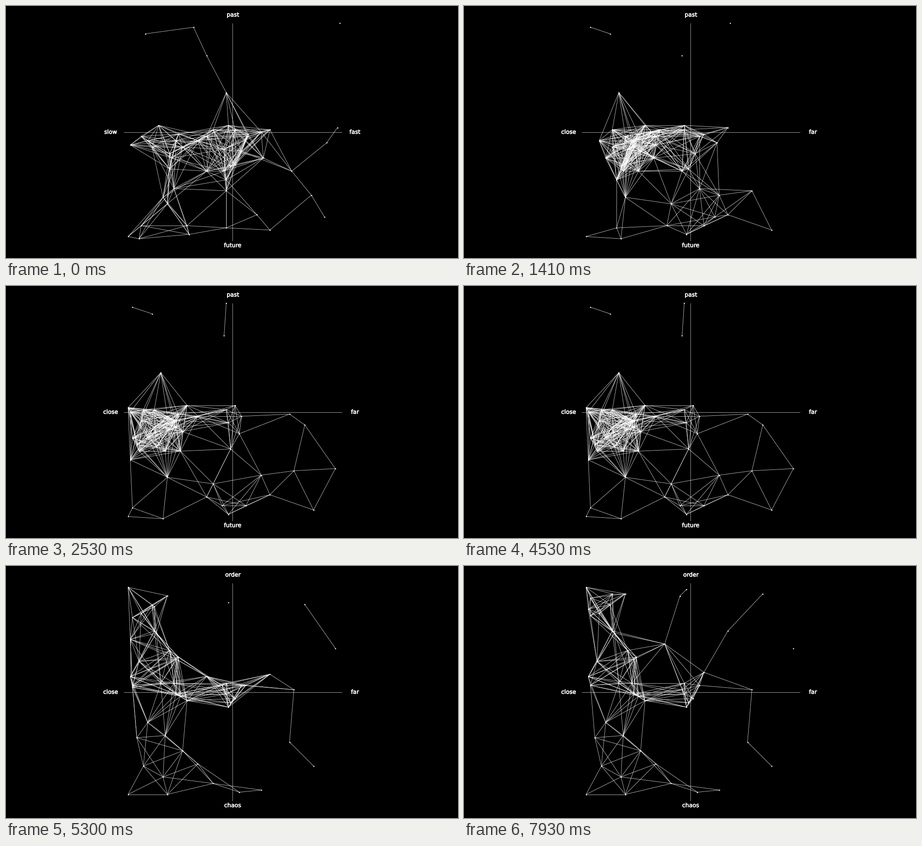
A matplotlib script that plays this animation: 1002 by 559 pixels, repeating every 8 s.

```python
import numpy as np
import matplotlib.pyplot as plt
from matplotlib.animation import FuncAnimation
from matplotlib.collections import LineCollection
from matplotlib.patheffects import withStroke

W, H, DPI = 1002, 559, 100
LOOP, INTERVAL, TICK = 8000, 20, 70
UNIT = 4.836            # pixels per scale step (scales run 0 to 100)
REACH = 25              # nodes closer than this are linked
PX = 72 / DPI           # one pixel in points

# Each node's rating on the four scales
TIME = np.array([
    0, 2, 5, 15, 32, 47, 47, 48, 49, 49, 49, 50, 51, 51, 52, 52, 52,
    54, 54, 54, 55, 56, 57, 57, 58, 59, 60, 62, 62, 65, 66, 67, 68,
    68, 68, 72, 76, 77, 79, 80, 83, 88, 89, 93, 93, 94, 95, 97, 98, 99])
SPEED = np.array([
    99, 32, 10, 38, 47, 16, 48, 98, 41, 51, 67, 63, 25, 57, 8, 57, 38,
    11, 24, 34, 93, 3, 13, 27, 46, 54, 21, 22, 64, 51, 49, 21, 38,
    77, 46, 47, 23, 47, 86, 18, 20, 61, 92, 8, 29, 47, 67, 30, 2, 7])
DISTANCE = np.array([
    47, 4, 13, 46, 17, 51, 29, 2, 14, 47, 9, 3, 76, 25, 34, 54, 20,
    24, 23, 8, 48, 83, 14, 24, 21, 27, 53, 11, 4, 6, 15, 49, 26,
    7, 19, 3, 97, 78, 63, 20, 41, 67, 38, 45, 56, 4, 87, 48, 2, 18])
ORDER = np.array([
    46, 47, 10, 49, 46, 53, 54, 2, 22, 51, 84, 43, 73, 34, 83, 47, 5,
    35, 46, 14, 3, 5, 5, 51, 31, 77, 96, 64, 15, 71, 23, 55, 52,
    36, 70, 12, 30, 49, 95, 97, 92, 22, 28, 6, 41, 7, 84, 57, 97, 89])

# Swap start and end, label swap, and travel (ms, scale steps)
X_SPAN, X_LABEL = (500, 2530), 500
X_TRAVEL = ([465, 820, 1060, 1410, 1970, 2495], [0, 2.9, 11.7, 31, 66.8, 96])
Y_SPAN, Y_LABEL = (4530, 5860), 4600
Y_TRAVEL = ([4530, 5300, 5840], [0, 46.1, 87])

PAIRS = np.triu_indices(len(TIME), 1)


def travel(t, span, keys):
    """Distance covered at time t, advancing once per tick."""
    start, end = span
    if t < start:
        return 0
    t = start + (min(t, end) - start) // TICK * TICK
    return np.interp(t, *keys)


def approach(a, b, step):
    return a + np.clip(b - a, -step, step)


fig = plt.figure(figsize=(W / DPI, H / DPI), dpi=DPI, facecolor="black")
ax = fig.add_axes([0, 0, 1, 1])
ax.set(xlim=(0, W), ylim=(H, 0))
ax.axis("off")

axis_style = dict(color="#a0a0a0", lw=PX, solid_capstyle="butt", zorder=1)
ax.plot([261, 745], [279.5, 279.5], **axis_style)
ax.plot([502.5, 502.5], [38, 521], **axis_style)

links = LineCollection([], colors="white", linewidths=0.8 * PX,
                       alpha=0.85, zorder=2)
ax.add_collection(links)
dots, = ax.plot([], [], "o", color="white", ms=2.6 * PX, mew=0, zorder=3)


def label(x, y):
    return ax.text(x, y, "", color="white", family="DejaVu Sans",
                   size=12.8 * PX, ha="center", va="baseline", zorder=4,
                   path_effects=[withStroke(linewidth=0.6 * PX,
                                            foreground="white")])


left, right = label(232, 283.5), label(773.5, 283.5)
top, bottom = label(503, 23.5), label(502.5, 535)


def update(i):
    t = i * INTERVAL + INTERVAL // 2
    x = approach(SPEED, DISTANCE, travel(t, X_SPAN, X_TRAVEL))
    y = approach(TIME, ORDER, travel(t, Y_SPAN, Y_TRAVEL))

    a, b = PAIRS
    near = np.hypot(x[a] - x[b], y[a] - y[b]) < REACH - 1e-6
    pos = np.column_stack([261 + UNIT * x, 37.5 + UNIT * y])
    links.set_segments(np.stack([pos[a[near]], pos[b[near]]], axis=1))
    dots.set_data(pos[:, 0], pos[:, 1])

    far_mode, order_mode = t >= X_LABEL, t >= Y_LABEL
    left.set_text("close" if far_mode else "slow")
    right.set_text("far" if far_mode else "fast")
    top.set_text("order" if order_mode else "past")
    bottom.set_text("chaos" if order_mode else "future")
    return links, dots, left, right, top, bottom


anim = FuncAnimation(fig, update, frames=LOOP // INTERVAL, interval=INTERVAL,
                     repeat=True, repeat_delay=0, blit=False)
plt.show()
```
